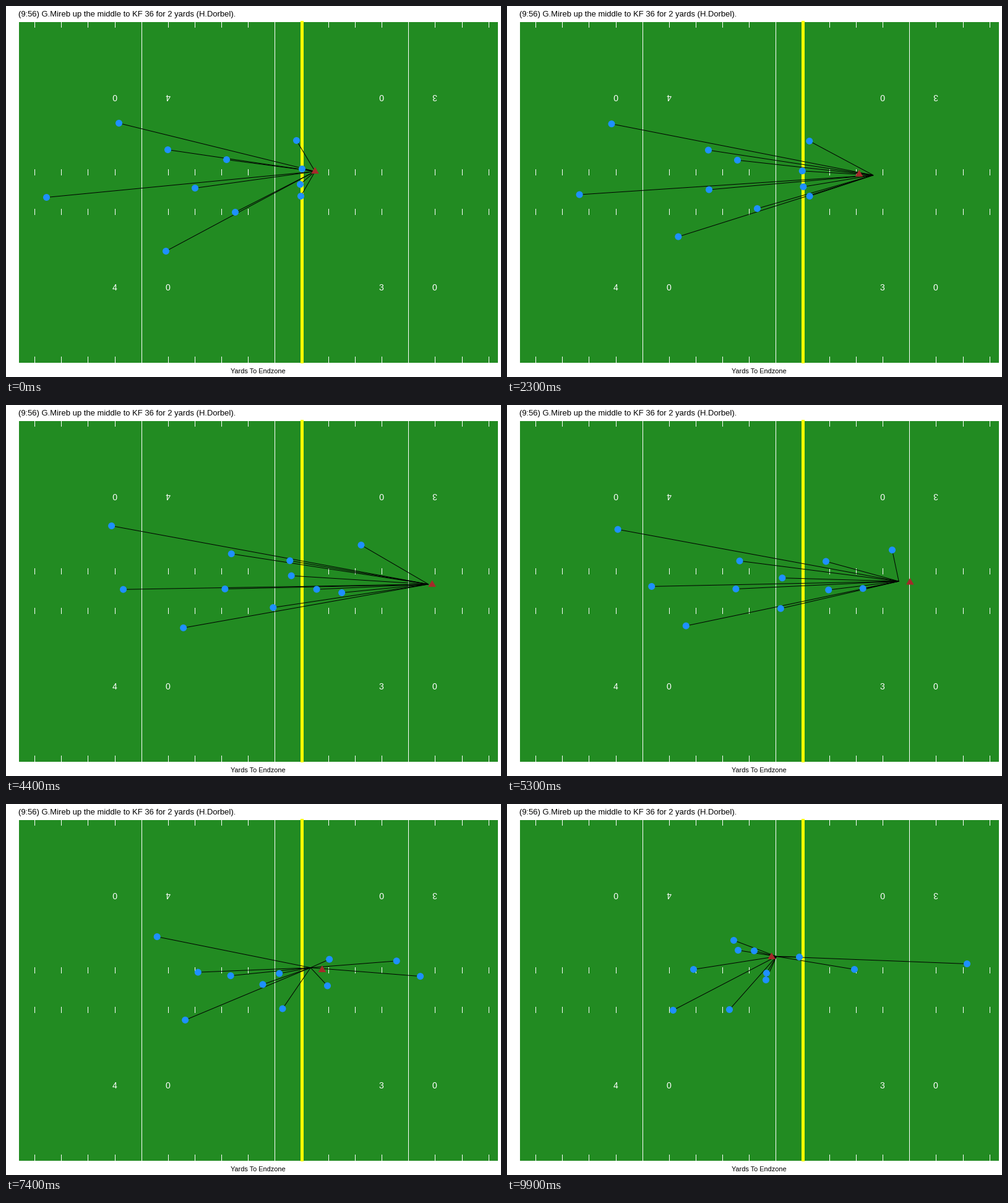
These frames come from a looping animation (800x600 px, 10000 ms). A matplotlib script:

```python
import matplotlib.pyplot as plt
import numpy as np
from matplotlib.animation import FuncAnimation
from matplotlib.collections import LineCollection
from matplotlib.patches import Rectangle

W, H, DPI = 800, 600, 100
FRAMES, INTERVAL = 100, 100
PX = 72 / DPI  # points per pixel
SNAP, LAG = 12, 2.7  # start of the play, delay of the ball marker

plt.rcParams["font.family"] = "Liberation Sans"
fig = plt.figure(figsize=(W / DPI, H / DPI), dpi=DPI, facecolor="white")
ax = fig.add_axes([0, 0, 1, 1])
ax.axis("off")


def box(x0, y0, x1, y1, color, z):
    """Fill the pixels from (x0, y0) to (x1, y1), both included."""
    ax.add_patch(Rectangle((x0 - 0.5, y0 - 0.5), x1 - x0 + 1, y1 - y0 + 1,
                           color=color, lw=0, zorder=z))


def label(x, y, text, size, color="black", ha="left", rotation=0):
    ax.text(x, y, text, fontsize=size * PX, color=color, ha=ha, va="baseline",
            rotation=rotation, rotation_mode="anchor", zorder=3)


def yard(k):
    return round(46.05 + 43.16 * k)


def draw_field():
    box(21, 26, 794, 576, "forestgreen", 0)
    for k in range(18):
        x = yard(k)
        if k % 5 == 4:
            box(x, 26, x, 576, "white", 1)
        else:
            box(x, 26, x, 34, "white", 1)
            for top in (264, 328, 567):
                box(x, top, x, top + 9, "white", 1)
    box(476, 24, 480, 577, "yellow", 2)
    for k, number in ((3, "40"), (13, "30")):
        for x, low, high in zip((yard(k), yard(k + 2)), number, number[::-1]):
            label(x - 1, 460, low, 14, "white", "center")
            label(x - 1, 141, high, 14, "white", "center", 180)
    label(20, 17, "(9:56) G.Mireb up the middle to KF 36 for 2 yards (H.Dorbel).", 13)
    label(407, 593, "Yards To Endzone", 11, ha="center")


def spline(t, points, at):
    """Monotone cubic curve through the points, held still outside t."""
    t, p = np.array(t, float), np.array(points, float)
    h = np.diff(t)[:, None]
    d = np.diff(p, axis=0) / h
    a, b = d[:-1], d[1:]
    inner = np.where(a * b > 0, 2 * a * b / np.where(a * b > 0, a + b, 1), 0)
    m = np.vstack([d[:1], inner, d[-1:]])
    at = np.clip(at, t[0], t[-1])
    i = np.clip(np.searchsorted(t, at, side="right") - 1, 0, len(h) - 1)
    u = (at - t[i])[:, None] / h[i]
    return (p[i] * (1 + 2 * u) * (1 - u) ** 2 + h[i] * m[i] * u * (1 - u) ** 2
            + p[i + 1] * u * u * (3 - 2 * u) + h[i] * m[i + 1] * u * u * (u - 1))


time = np.arange(FRAMES)


def roam(*points):
    """A defender already moving before the snap."""
    return spline((0, 33, 63, 85, 99), points, time)


def rush(*points):
    """A defender who stands still until the snap."""
    return spline((0, SNAP, 33, 63, 85, 99), points[:1] + points, time)


def carry(at):
    return spline((SNAP, 33, 40, 63, 85, 96, 99),
                  [(499, 267), (662, 280), (689, 290), (565, 277), (439, 252),
                   (427, 247), (435, 246)], at)


defenders = np.stack([
    roam((182, 189), (166, 191), (192, 207), (312, 219), (366, 220)),
    roam((261, 232), (346, 233), (381, 264), (332, 285), (301, 267)),
    roam((305, 294), (337, 297), (388, 297), (431, 285), (418, 284)),
    roam((65, 309), (144, 302), (276, 286), (339, 254), (373, 236)),
    roam((370, 333), (417, 326), (447, 330), (445, 331), (359, 332)),
    roam((258, 396), (282, 365), (290, 353), (287, 344), (268, 333)),
    rush((356, 248), (401, 250), (546, 253), (476, 246), (399, 237)),
    rush((478, 263), (474, 271), (435, 281), (453, 261), (472, 247)),
    rush((469, 217), (521, 220), (648, 243), (600, 262), (561, 267)),
    rush((475, 288), (485, 296), (529, 299), (496, 284), (419, 273)),
    rush((476, 307), (511, 307), (614, 288), (717, 268), (743, 258)),
])
hub = carry(time)
ball = carry(time - LAG)

draw_field()
links = ax.add_collection(LineCollection([], colors="black", linewidths=PX,
                                         zorder=4))
dots = ax.scatter([], [], s=(11 * PX) ** 2, c="dodgerblue",
                  edgecolors="none", zorder=5)
carrier = ax.scatter([], [], s=(14.5 * PX) ** 2, marker=(3, 0), c="brown",
                     edgecolors="none", zorder=6)
ax.set_xlim(-0.5, W - 0.5)
ax.set_ylim(H - 0.5, -0.5)


def update(n):
    spots = defenders[:, n]
    links.set_segments([(s, hub[n]) for s in spots])
    dots.set_offsets(spots)
    carrier.set_offsets(ball[n:n + 1])
    return links, dots, carrier


anim = FuncAnimation(fig, update, frames=FRAMES, interval=INTERVAL,
                     repeat=True, repeat_delay=0)
plt.show()
```
